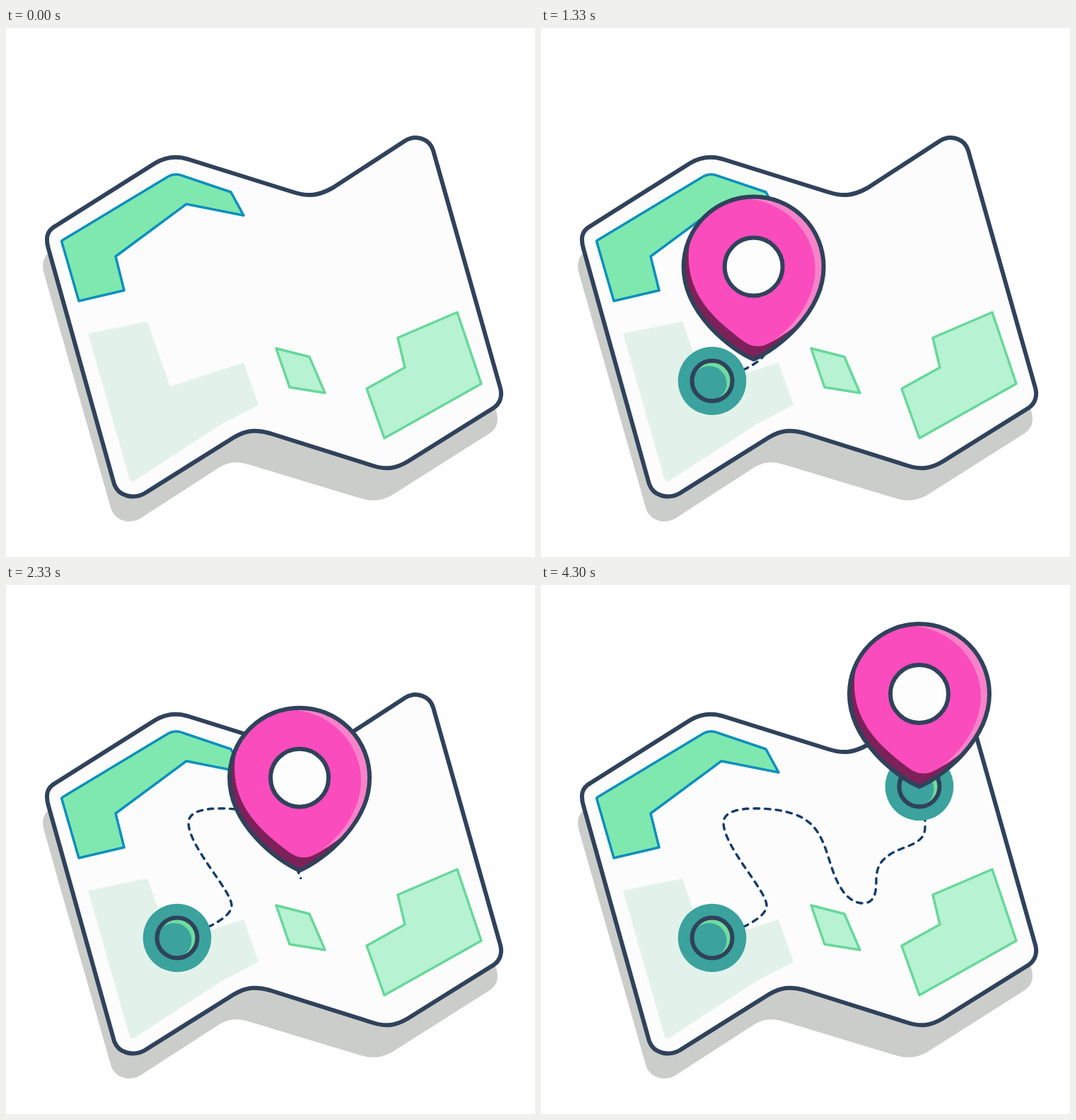
An HTML page that plays this animation: 748 px wide and 748 px high, repeating every 5010 ms.

```html
<!DOCTYPE html>
<html lang="en">
<head>
<meta charset="utf-8">
<title>Map route</title>
<style>
  html, body { margin: 0; width: 100%; height: 100%; overflow: hidden; background: #fff; }
  svg { display: block; width: 100vw; height: 100vh; }
  .ink { stroke: #30425b; stroke-width: 6; stroke-linejoin: round; }
  .park { fill: #b7f2d2; stroke: #68d79b; stroke-width: 3.5; stroke-linejoin: round; }
</style>
</head>
<body>
<svg viewBox="0 0 748 748">
  <defs>
    <path id="pinShape" d="M0-3C-33-17-99-69-99-134A99 99 0 0 1 99-134C99-69 33-17 0-3Z"/>
    <clipPath id="pinClip"><use href="#pinShape"/></clipPath>
    <path id="route" fill="none" d="M246 501C261 493 275 489 289 482C305 474 319 464 319 453
      C319 432 258 370 258 336C258 321 278 316 303 316C322 316 339 318 355 323
      C391 334 399 362 408 390C417 420 430 449 455 450C474 450 474 430 474 416
      C475 396 482 389 492 382C512 368 543 368 543 343L543 323C543 310 537 303 535 292"/>
    <mask id="reveal" maskUnits="userSpaceOnUse" x="0" y="0" width="748" height="748">
      <use id="revealLine" href="#route" stroke="#fff" stroke-width="12"/>
    </mask>
    <g id="spot">
      <circle r="48.3" fill="#3ba29d"/>
      <circle r="28.5" fill="#6fdc9f"/>
      <circle cx="-4" cy="3.5" r="24.5" fill="#3ba29d"/>
      <circle class="ink" r="28.5" fill="none"/>
    </g>
  </defs>

  <path fill="#cbcdca" d="M58 320C50 330 52 340 54 348L148 678C152 695 172 703 189 694L302 621
    C318 612 330 613 346 618L498 664C516 670 530 669 545 661L684 573C693 567 697 558 694 545L690 530Z"/>
  <path class="ink" fill="#fcfcfc" d="M60 312C56 298 57 287 70 280L211 191C226 182 241 180 259 186L406 232
    C428 239 442 237 462 226L565 159C580 150 599 157 604 173L699 509C702 520 699 531 689 537.5
    L568 613C551 623 538 625 519 619L373 573C352 567 339 569 322 579L196 658C180 667 159 662 153 645Z"/>
  <path fill="#7fe8af" stroke="#0b8fbd" stroke-width="3.5" stroke-linejoin="round"
    d="M80 300L226 212Q238 204 250 209L318 232L336 265L255 249L155 323L167 371L103 386L79 303Q78 301 80 300Z"/>
  <path fill="#e2f2ea" d="M116 432L200 415L232 507L336 473L357 533L305 560L182 640Q178 643 175 639Z"/>
  <path class="park" d="M382 453L429 465L451 516L401 508Z"/>
  <path class="park" d="M638 402L672 503L535 580L510 510L564 480L554 438Z"/>

  <g mask="url(#reveal)">
    <use href="#route" stroke="#143c69" stroke-width="3.4" stroke-linecap="round"
      stroke-dasharray="7.5 8" stroke-dashoffset="-12.5"/>
  </g>
  <use id="startSpot" href="#spot"/>
  <use id="endSpot" href="#spot"/>

  <g id="pin">
    <g clip-path="url(#pinClip)">
      <use href="#pinShape" fill="#7d2159"/>
      <path fill="#f782ca" d="M-45-238H105V-118C97-78 65-50 24-27L0-88Z"/>
      <path fill="#fb4cbd" d="M-35-230C40-238 87-183 87-130C87-88 55-46 24-27Q6-16-12-27
        C-55-58-92-93-92-148C-92-188-70-220-35-230Z"/>
    </g>
    <use class="ink" href="#pinShape" fill="none"/>
    <circle class="ink" cy="-134" r="41" fill="#fdfdfd"/>
  </g>
</svg>
<script>
  const LOOP = 5010;
  const $ = id => document.getElementById(id);
  const route = $('route');
  const routeLength = route.getTotalLength();

  const span = (t, from, to) => Math.min(1, Math.max(0, (t - from) / (to - from)));
  const ease = p => (1 - Math.cos(Math.PI * p)) / 2;

  // Grows, dips slightly, then settles at full size.
  const pulse = t => ease(span(t, 0, 333))
    - 0.19 * ease(span(t, 333, 667))
    + 0.19 * ease(span(t, 667, 1000));

  function place(el, x, y, scale) {
    el.style.display = scale > 0.001 ? '' : 'none';
    el.setAttribute('transform', `translate(${x} ${y}) scale(${scale})`);
  }

  function render(t) {
    place($('startSpot'), 242, 499, pulse(t));
    place($('endSpot'), 535, 285, pulse(t - 2767));

    const drawn = routeLength * span(t, 1095, 3045);
    $('revealLine').setAttribute('stroke-dasharray', `${drawn} ${routeLength + 50}`);
    $('revealLine').style.display = drawn ? '' : 'none';

    const tip = route.getPointAtLength(routeLength * span(t, 1172, 3022));
    place($('pin'), tip.x, tip.y - 4, ease(span(t, 700, 1100)));
  }

  // Poses change 0 and 30 ms into every tenth of a second.
  const step = t => Math.floor(t / 100) * 100 + (t % 100 >= 30 ? 30 : 0);

  const begin = performance.now();
  function tick() {
    render(step((performance.now() - begin) % LOOP));
    requestAnimationFrame(tick);
  }
  render(0);
  requestAnimationFrame(tick);
</script>
</body>
</html>
```
